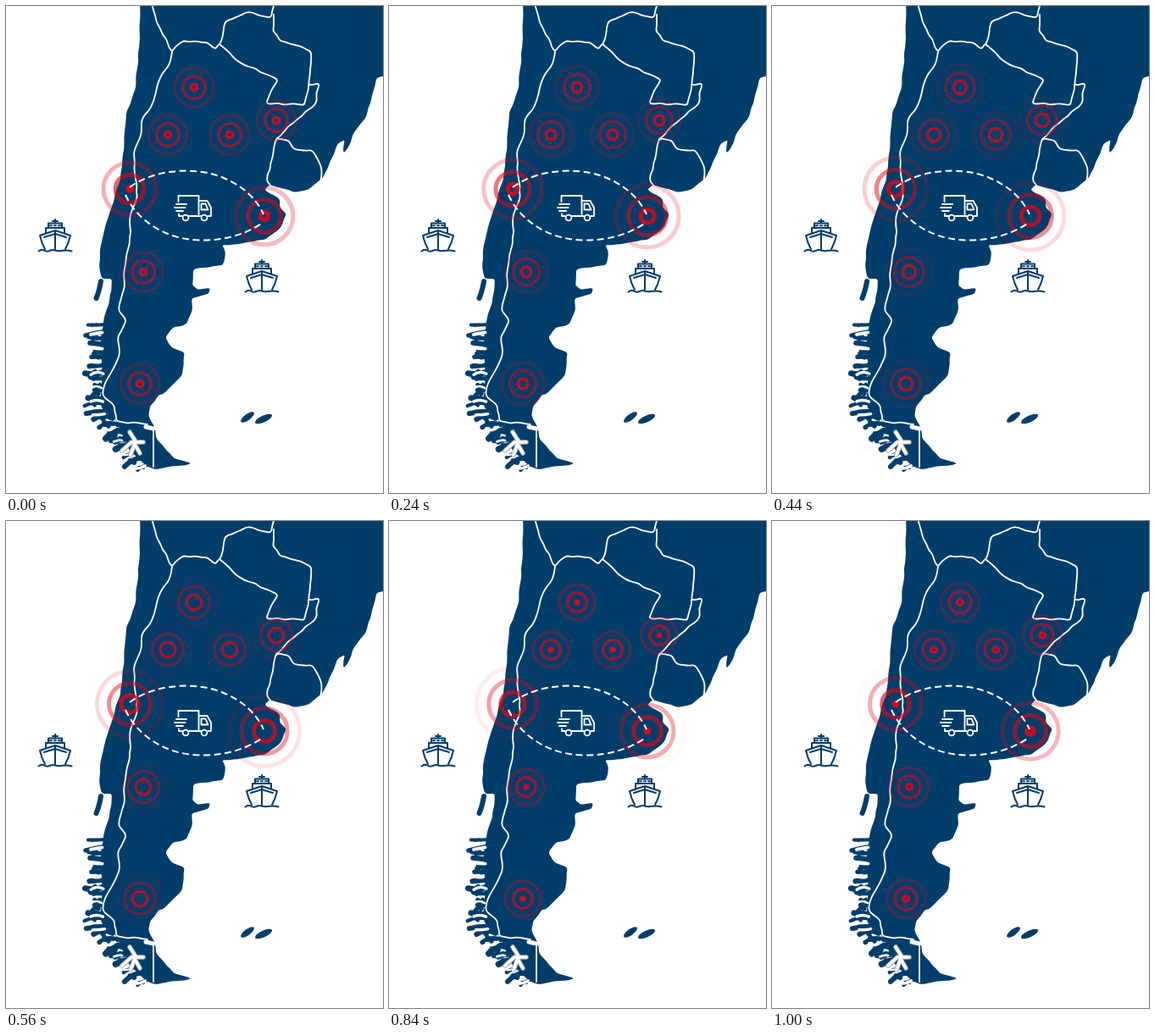
An HTML page for the animation above (1040 ms loop, 445 by 575 pixels).

```html
<!DOCTYPE html>
<html lang="en">
<head>
<meta charset="utf-8">
<title>Route map</title>
<style>
  html, body { margin: 0; width: 100%; height: 100%; overflow: hidden; background: #fff; }
  svg { display: block; width: 445px; height: 575px; }
  svg * { stroke-linecap: round; stroke-linejoin: round; }
  .line { fill: none; stroke: #fff; stroke-width: 1.8; }
  .navy { fill: none; stroke: #003d6b; }
  #route path { stroke-width: 2; stroke-dasharray: 8 4.5; stroke-linecap: butt; }
</style>
</head>
<body>
<svg viewBox="0 0 445 575">
  <defs>
    <g id="ship" class="navy" stroke-width="2">
      <path d="M58 252V256M55 254H61M50 262V256.500H66V262M47 268V262H69V268M58 266V287"/>
      <path d="M46 287Q42 280 40 271L58 265L76 271Q74 280 70 287M45 273L58 269L71 273"/>
      <path stroke-dasharray="2 3" d="M52 259.300H65"/>
      <path d="M38.500 289.500Q42 286.500 45 288.500T51.500 289T58 288.500T64.500 289T71 288.500T77.500 289.500"/>
    </g>
    <path id="channels" d="M137 525L148 515H162M146 503L153 514L147 530M153 519L158 528"/>
  </defs>

  <g id="land" fill="#003d6b">
    <ellipse rx="9.500" ry="3.600" transform="translate(285 485.500) rotate(-36)"/>
    <ellipse rx="11" ry="3.800" transform="translate(304 487.500) rotate(-25)"/>
  </g>
  <path class="navy" stroke-width="6" d="M112 325Q110 337 106.500 345"/>
  <g id="fjords" class="navy"></g>
  <g id="inlets" class="line"></g>
  <g class="line">
    <path stroke-width="5" style="stroke-width:5" d="M165 497L174 499"/>
    <use href="#channels" style="stroke:#a9aeb6;stroke-width:5.500"/>
    <use href="#channels" style="stroke-width:3.600"/>
  </g>

  <g id="borders" class="line"></g>
  <g id="rings" fill="none" stroke="#e20613"></g>

  <g id="route" class="line">
    <path d="M146 214C170 196 206 192 232 196C268 202 293 222 304 246"/>
    <path d="M141 223C153 250 185 276 230 276.500C258 277 282 270 303 256"/>
  </g>
  <g class="line">
    <path d="M203.500 231V224H227.500V247.500M227.500 230H237.500L242 238V248H238.500M230 248H216M208 248H204V245.500"/>
    <path d="M230.500 240.500V233.500H235.500L238.500 240.500ZM201 234H213M199 238H211.500M201 242H209"/>
    <circle cx="212" cy="250" r="3.400"/>
    <circle cx="234" cy="250" r="3.400"/>
  </g>
  <use href="#ship"/>
  <use href="#ship" x="244" y="48"/>
</svg>

<script>
const SVG = "http://www.w3.org/2000/svg";

function add(parent, tag, attrs) {
  const el = document.createElementNS(SVG, tag);
  for (const key in attrs) el.setAttribute(key, attrs[key]);
  return document.getElementById(parent).appendChild(el);
}

let seed = 7;
function random(low, high) {
  seed = seed * 16807 % 2147483647;
  return low + (high - low) * seed / 2147483647;
}

// Joins key points with a softly rounded line that wavers by `rough` pixels
function trace(text, rough) {
  const keys = text.trim().split(/\s+/).map(p => p.split(",").map(Number));
  const pts = [keys[0]];
  for (let i = 1; i < keys.length; i++) {
    const [x, y] = keys[i - 1], [u, v] = keys[i];
    const n = Math.max(2, Math.round(Math.hypot(u - x, v - y) / 7));
    for (let k = 1; k < n; k++) {
      pts.push([x + (u - x) * k / n + random(-rough, rough),
                y + (v - y) * k / n + random(-rough, rough)]);
    }
    pts.push([u, v]);
  }
  let d = "M" + pts[0];
  for (let i = 1; i < pts.length - 1; i++) {
    const [x, y] = pts[i], [u, v] = pts[i + 1];
    d += `Q${x} ${y} ${(x + u) / 2} ${(y + v) / 2}`;
  }
  return d + "L" + pts[pts.length - 1];
}

const eastCoast = `450,-5 450,82 437,85 433,102 424,133 409,152 405,165 398,174 400,158 392,162
  385,179 374,203 357,217 341,220 311,211 305,217 323,228 323,238 331,246 323,263 306,276
  276,281 255,282 259,291 256,306 238,309 221,311 220,330 226,335 241,333 239,340 219,345
  220,360 213,376 197,379 188,391 195,403 211,409 208,436 187,457 180,459 170,472 168,483
  175,496 177,510 198,534 219,540 177,547`;
const westCoast = `164,542 146,525 138,508 130,489 112,474 113,445 112,400 115,372 122,350 125,322
  113,322 110,305 112,282 122,245 135,205 138,175 142,125 152,100 157,50 158,-5`;

const borders = [
  "172,-3 178,20 196,54 210,41 237,43 247,51 253,44 259,18 284,7 313,14 317,-3",
  "316,10 315,30 323,41 341,46 360,54 357,93 369,91 365,116 319,157",
  "252,45 275,66 321,87 307,115 352,117 357,93",
  "313,213 308,207 319,156 334,159 340,169 361,170 372,190 371,208",
  `196,54 191,72 179,92 173,115 160,135 160,150 151,172 152,198 155,225 147,246 146,280
   140,310 140,332 133,360 142,371 132,390 134,412 118,443 114,460 128,472 130,490 167,494`,
  "174,501 174,544"
];

add("land", "path", { d: trace(eastCoast + " " + westCoast, 0.9) });
borders.forEach((b, i) => add("borders", "path", { d: trace(b, i < 5 ? 1.3 : 0) }));

// Ragged fjord coast: land fingers with inlets cut between them
const FINGERS = 22;
for (let i = 0; i < FINGERS; i++) {
  const f = i / (FINGERS - 1);
  const x = 113 + Math.max(0, f - 0.6) * 130, y = 376 + 166 * f;
  const reach = random(12, 25), bend = random(-6, 6), drop = random(-3, 5) + 5 * f;
  add("fjords", "path", {
    d: `M${x + 4} ${y}q${-reach / 2} ${bend} ${-reach} ${drop}m${reach / 2} ${-drop / 2}l-5 ${bend}`,
    "stroke-width": random(4, 7.5)
  });
  if (i % 2) {
    add("inlets", "path", {
      d: `M${x - 13} ${y + 4}q7 ${-bend} ${random(9, 15)} ${-drop / 2}`,
      style: `stroke-width:${random(2, 4)}`
    });
  }
}

// x, y, ring spacing, line width, start time
const small = [[222, 96], [191, 152], [264, 152], [319, 135], [162, 314], [158, 446]]
  .map(p => [...p, 9.6, 3.5, 640]);
const spots = [...small, [146, 216, 14.2, 5, 850], [305, 248, 14.5, 5, 700]];

const LOOP = 1040, STEP = 40, LIFE = 3.2;
const rings = spots.flatMap(([cx, cy, gap, width, start]) =>
  [0, 1, 2, 3].map(k => ({
    el: add("rings", "circle", { cx, cy, "stroke-width": width }),
    gap, start, k
  })));

function draw(now) {
  const t = Math.floor(now % LOOP / STEP) * STEP;
  for (const { el, gap, start, k } of rings) {
    const age = k + (t - start + LOOP) % LOOP / LOOP;
    el.setAttribute("r", gap * age);
    el.setAttribute("opacity", Math.max(0, 1 - age / LIFE));
  }
}

const begin = performance.now();
function tick() {
  draw(performance.now() - begin);
  requestAnimationFrame(tick);
}
tick();
</script>
</body>
</html>
```
